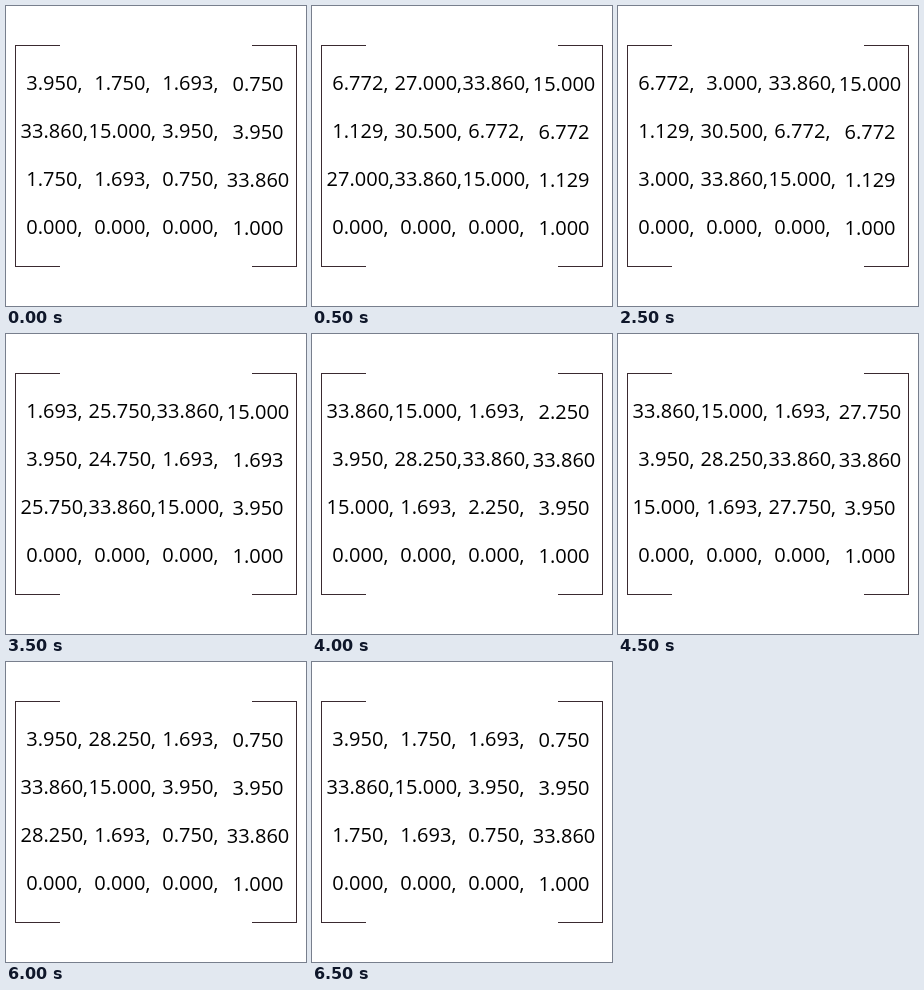
Animation, 300 px wide and 300 px high, one loop 7 s. Source, as an HTML page with a canvas:

```html
<!DOCTYPE html>
<html lang="en">
<head>
<meta charset="utf-8">
<title>Matrix steps</title>
<style>
html, body { margin: 0; width: 100%; height: 100%; overflow: hidden; background: #fff; }
canvas { display: block; }
</style>
</head>
<body>
<canvas id="stage" width="300" height="300"></canvas>
<script>
const ctx = document.getElementById('stage').getContext('2d');
const STEP = 500;
const LONG = 33.86, WIDE = 3.95, THIN = 1.693, MID = 15;

// Each part has a size [x, y, z] and a position [x, y, z].
const rail = (x, z) => ({ size: [WIDE, LONG, THIN], pos: [x, MID, z] });
const slat = x => ({ size: [6.772, 1.129, LONG], pos: [x, 30.5, MID] });
const beam = x => ({ size: [THIN, WIDE, LONG], pos: [x, 24.75, MID] });
const bar = z => ({ size: [LONG, WIDE, THIN], pos: [MID, 28.25, z] });

const parts = [
  rail(1.75, 0.75),
  ...[27, 21, 15, 9, 3].map(slat),
  ...[4.25, 25.75].map(beam),
  ...[2.25, 27.75].map(bar),
  rail(1.75, 29.25),
  rail(28.25, 29.25),
  rail(28.25, 0.75),
  rail(1.75, 0.75)
];

function matrix({ size: [w, h, d], pos: [x, y, z] }) {
  return [
    [w, x, d, z],
    [h, y, w, w],
    [x, d, z, h],
    [0, 0, 0, 1]
  ];
}

function drawBracket(edge, armX) {
  ctx.fillRect(edge, 39, 1, 222);
  ctx.fillRect(armX, 39, 45, 1);
  ctx.fillRect(armX, 260, 45, 1);
}

function draw(part) {
  ctx.fillStyle = '#fff';
  ctx.fillRect(0, 0, 300, 300);
  ctx.fillStyle = '#3a2a30';
  drawBracket(9, 9);
  drawBracket(290, 246);

  ctx.fillStyle = '#000';
  ctx.font = '20px "Open Sans", "Noto Sans", sans-serif';
  ctx.textAlign = 'center';
  matrix(part).forEach((row, r) => row.forEach((value, c) => {
    const last = c === 3;
    const x = last ? 252 : 48.3 + 68 * c;
    const y = (last ? 85 : 84) + 48 * r;
    ctx.fillText(value.toFixed(3) + (last ? '' : ','), x, y);
  }));
}

function tick() {
  draw(parts[Math.floor(performance.now() / STEP) % parts.length]);
  requestAnimationFrame(tick);
}
tick();
</script>
</body>
</html>
```
